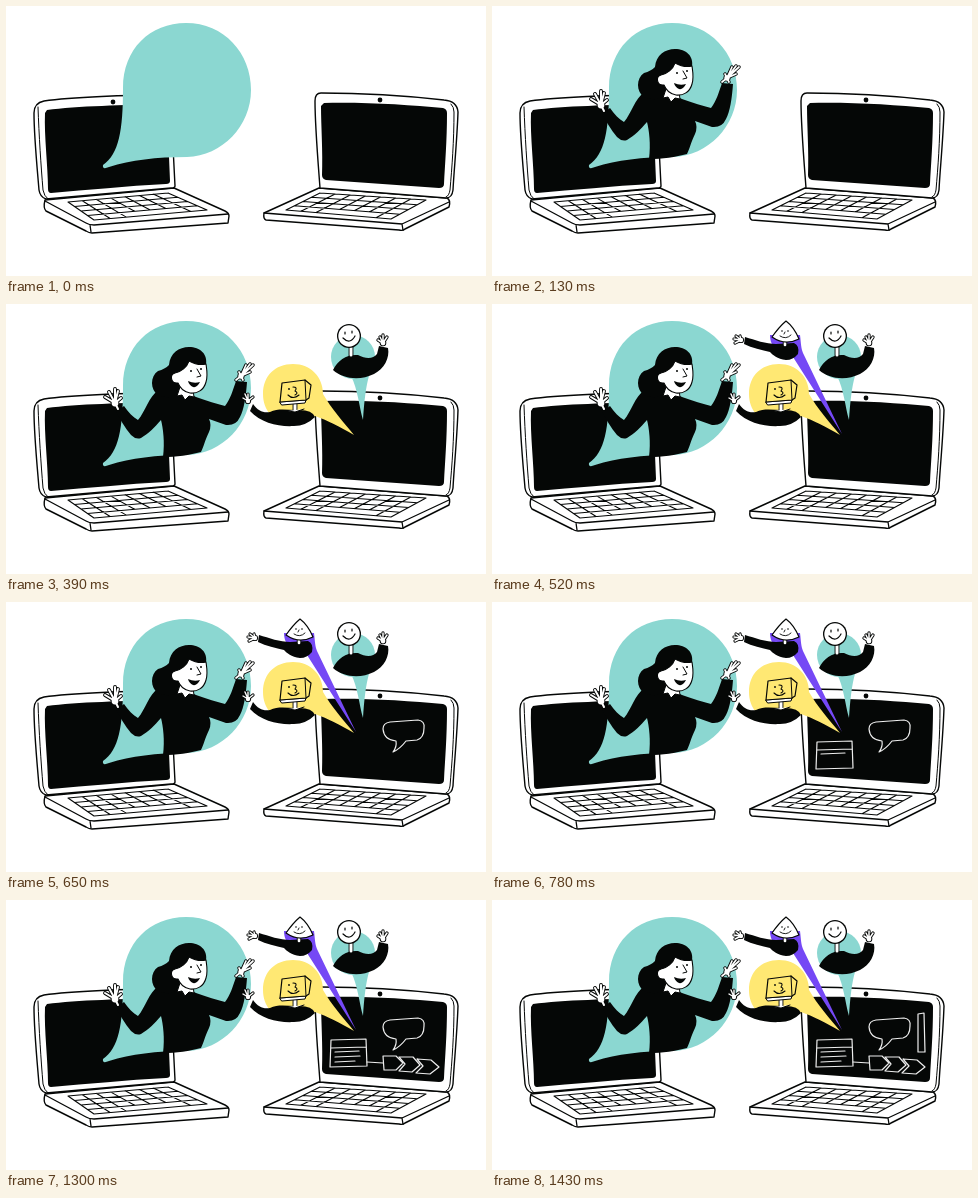
Recreate the animation shown at these times as an HTML page with a canvas. Size 480 by 270 pixels, loop 1560 ms.

```html
<!DOCTYPE html>
<html lang="en">
<head>
<meta charset="utf-8">
<title>Laptop call</title>
<style>
html, body { margin: 0; width: 100%; height: 100%; overflow: hidden; background: #fff; }
canvas { display: block; width: 480px; height: 270px; }
</style>
</head>
<body>
<canvas id="stage" width="480" height="270"></canvas>
<script>
const ctx = document.getElementById('stage').getContext('2d');
const STEP = 130, STEPS = 12;
const INK = '#050706', WHITE = '#fff', TEAL = '#8bd7d1', YELLOW = '#ffe873', PURPLE = '#7548f5';

ctx.lineCap = ctx.lineJoin = 'round';

function fill(d, color) {
  ctx.fillStyle = color;
  ctx.fill(new Path2D(d));
}

function line(d, width = 1.3, color = INK) {
  ctx.lineWidth = width;
  ctx.strokeStyle = color;
  ctx.stroke(new Path2D(d));
}

function shape(d, color = WHITE, width = 1.4) {
  fill(d, color);
  line(d, width);
}

function dot(x, y, r, color = INK) {
  ctx.fillStyle = color;
  ctx.beginPath();
  ctx.arc(x, y, r, 0, Math.PI * 2);
  ctx.fill();
}

// Fingers fan out from the palm; the ink pass forms the outline.
function hand(x, y, palm, tips, width) {
  const d = tips.map(([dx, dy]) => `M${x} ${y}l${dx} ${dy}`).join('');
  line(d, width + 1.8);
  dot(x, y, palm + 0.9);
  line(d, width, WHITE);
  dot(x, y, palm, WHITE);
}

function keys(a, b, c, d, rows, cols) {
  const mix = (p, q, t) => [p[0] + (q[0] - p[0]) * t, p[1] + (q[1] - p[1]) * t];
  const at = (u, v) => mix(mix(a, b, u), mix(d, c, u), v).join(' ');
  let path = '';
  for (let r = 0; r <= rows; r++) path += `M${at(0, r / rows)}L${at(1, r / rows)}`;
  for (let k = 0; k <= cols; k++) {
    const end = k > 2 && k < 6 ? 1 - 1 / rows : 1;
    path += `M${at(k / cols, 0)}L${at(k / cols, end)}`;
  }
  line(path, 1.1);
}

function leftLaptop() {
  shape('M39 194L168 182L219 205Q223 207 223 210L222 217L86 227Q83 227 80 225L40 205Q37 202 39 194Z');
  line('M39 195L80 217Q83 219 88 219L222 208M84 219L85 226');
  keys([62, 196], [162, 187], [201, 204], [88, 214], 4, 7);
  shape('M40 193Q34 191 33 184C31 160 28 130 28 107Q28 97 38 95C66 91 125 89 152 89Q163 91 165 101L169 180Q169 182 165 182Z');
  line('M32 101C33 130 35 160 37 184Q38 190 42 193', 1);
  fill('M41 104C70 100 120 99 157 98Q161 98 161 102L164 175Q164 178 160 178C120 180 82 184 45 187Q42 187 42 183C42 160 38 130 39 107Z', INK);
  dot(107, 96, 2.4);
}

function rightLaptop() {
  shape('M313 182L441 192Q445 194 443 201L399 223Q397 225 393 224L260 214Q257 213 258 207Z');
  line('M258 207L396 218L443 196M396 218L397 224');
  keys([314, 187], [420, 194], [385, 213], [280, 204], 4, 7);
  shape('M314 182C312 155 309 120 309 95Q309 87 315 87C358 87 403 90 438 94Q451 95 452 106C451 135 448 164 447 184Q446 192 440 192Z');
  line('M445 98Q448 101 448 106C448 135 446 161 444 184Q443 190 440 191', 1);
  fill('M318 97C360 96 403 99 437 102Q441 103 441 107C441 135 439 158 438 178Q438 182 433 182L320 174Q316 173 316 169C317 146 315 120 315 100Z', INK);
  dot(374, 94, 2.4);
}

function bigBubble() {
  fill('M97 159C113 148 117 124 117 82C117 43 144 17 180 17C218 17 245 47 245 84C245 120 216 150 181 151C150 151 125 154 103 161Q96 164 97 159Z', TEAL);
}

function woman() {
  fill('M118 102C122 108 127 113 132 116C139 108 143 92 152 87L170 83L190 93C201 97 211 100 219 102C224 96 227 86 230 77L241 78C240 92 238 106 234 113Q230 122 220 121L203 115Q206 121 203 128C199 136 198 142 195 148C184 151 170 153 157 153C159 138 157 124 155 116C149 123 142 130 135 134Q130 136 125 131C119 124 114 115 110 108Z', INK);
  fill('M152 91C144 86 144 72 152 67Q159 65 163 61C164 49 173 43 183 43C194 43 202 50 200 61C202 69 184 82 176 88C170 93 160 95 152 91Z', INK);
  shape('M174 83L171 92L176 91L179 96L183 92L188 93L187 86Z', WHITE, 1);
  shape('M169 69C175 68 181 63 183 57Q192 62 200 60C201 67 202 72 200 78C198 86 191 90 184 89C178 88 174 84 172 79C165 80 163 71 169 69Z', WHITE, 1.1);
  dot(185, 67, 1);
  dot(195, 65, 1);
  line('M191 65L195 72L191 73', 1);
  fill('M182 77Q188 80 194 78Q191 84 187 83Q183 81 182 77Z', INK);
  hand(109, 99, 3.4, [[-10, -6], [-6, -11], [0, -14], [3, -12], [6, -5], [3, 6]], 2);
  hand(235, 72, 2.7, [[-5, 4], [-2, -4], [5, -11], [9, -12], [12, -11], [9, -4], [2, 4]], 1.7);
}

function cubePerson() {
  fill('M257 90C257 72 269 60 287 60C305 60 317 73 317 90C325 104 338 119 348 131C334 123 321 116 309 112C300 119 290 121 282 120C267 117 257 106 257 90Z', YELLOW);
  fill('M247 100C252 107 257 109 264 108C272 104 281 106 290 106Q306 105 309 113Q300 122 288 122C273 123 255 119 244 107Z', INK);
  line('M289 98V107', 4.8);
  line('M289 98V106', 3, WHITE);
  shape('M282 107L289 108L298 105', WHITE, 1);
  shape('M274 98L300 96L299 99L276 101Z', WHITE, 1);
  shape('M274 98L276 79L299 76L305 81L303 94L300 96Z', YELLOW, 1.2);
  line('M299 76L300 96', 1);
  dot(283, 85, 0.9);
  line('M287 83Q292 83 289 87Q293 89 289 91M282 91Q287 96 293 91', 1.1);
  hand(242, 97, 2.2, [[-5, -3], [-3, -7], [0, -7], [5, -4]], 1.4);
}

function conePerson() {
  fill('M278 31H308C309 39 309 44 311 49L350 130L301 53C287 52 278 43 278 31Z', PURPLE);
  fill('M253 33C263 36 274 40 284 40L302 39Q308 42 306 50Q301 56 294 56C285 55 281 51 278 48C270 46 260 44 252 40Z', INK);
  line('M293 36V42', 4.4);
  line('M293 36V41', 2.6, WHITE);
  shape('M294 17Q287 23 280 33Q293 42 307 35Q302 23 294 17Z', WHITE, 1.2);
  dot(290, 27, 0.8);
  dot(296, 27, 0.8);
  line('M288 32Q294 36 299 31M293 28L292 30', 0.9);
  hand(249, 36, 2.2, [[-5, -4], [-7, -1], [-6, 3], [-1, -4]], 1.4);
}

function roundPerson() {
  dot(347, 53, 22, TEAL);
  fill('M345 72H363C360 82 358 98 357 116C353 102 352 86 345 72Z', TEAL);
  fill('M327 66C332 56 341 50 352 51C360 55 367 55 371 50L373 42L382 44C384 54 378 65 368 70C354 77 337 75 327 66Z', INK);
  line('M345 41V52', 4.8);
  line('M345 41V51', 3, WHITE);
  dot(343, 32, 12);
  dot(343, 32, 10.7, WHITE);
  line('M339 28V30M346 27V29M337 34Q344 41 349 32', 1.2);
  hand(377, 39, 2.4, [[-5, -3], [-3, -6], [0, -8], [4, -6]], 1.5);
}

const sketch = d => line(d, 1.2, '#eee');

const scene = [
  () => { leftLaptop(); rightLaptop(); bigBubble(); },
  woman,
  cubePerson,
  roundPerson,
  conePerson,
  () => sketch('M377 127Q377 121 384 120L412 118Q419 119 418 126Q418 136 411 138L400 139Q394 147 387 150Q391 145 390 139Q378 138 377 127Z'),
  () => sketch('M325 140L360 139L361 166L324 167ZM325 148L360 147M329 152L353 151'),
  () => sketch('M329 157L354 156M329 162L349 161'),
  () => sketch('M361 162L377 163M377 156L390 156L397 163L390 170L378 170Z'),
  () => sketch('M393 157L407 157L414 165L406 172L393 171L399 164Z'),
  () => sketch('M411 159L425 160L433 167L424 174L410 173L417 166Z'),
  () => sketch('M426 114L432 113L433 152L426 152Z')
];

let shown = -1;
const start = performance.now();

function draw(now) {
  const step = Math.floor(Math.max(0, now - start) / STEP) % STEPS;
  if (step !== shown) {
    shown = step;
    ctx.fillStyle = WHITE;
    ctx.fillRect(0, 0, 480, 270);
    scene.slice(0, step + 1).forEach(part => part());
  }
  requestAnimationFrame(draw);
}

draw(start);
</script>
</body>
</html>
```
